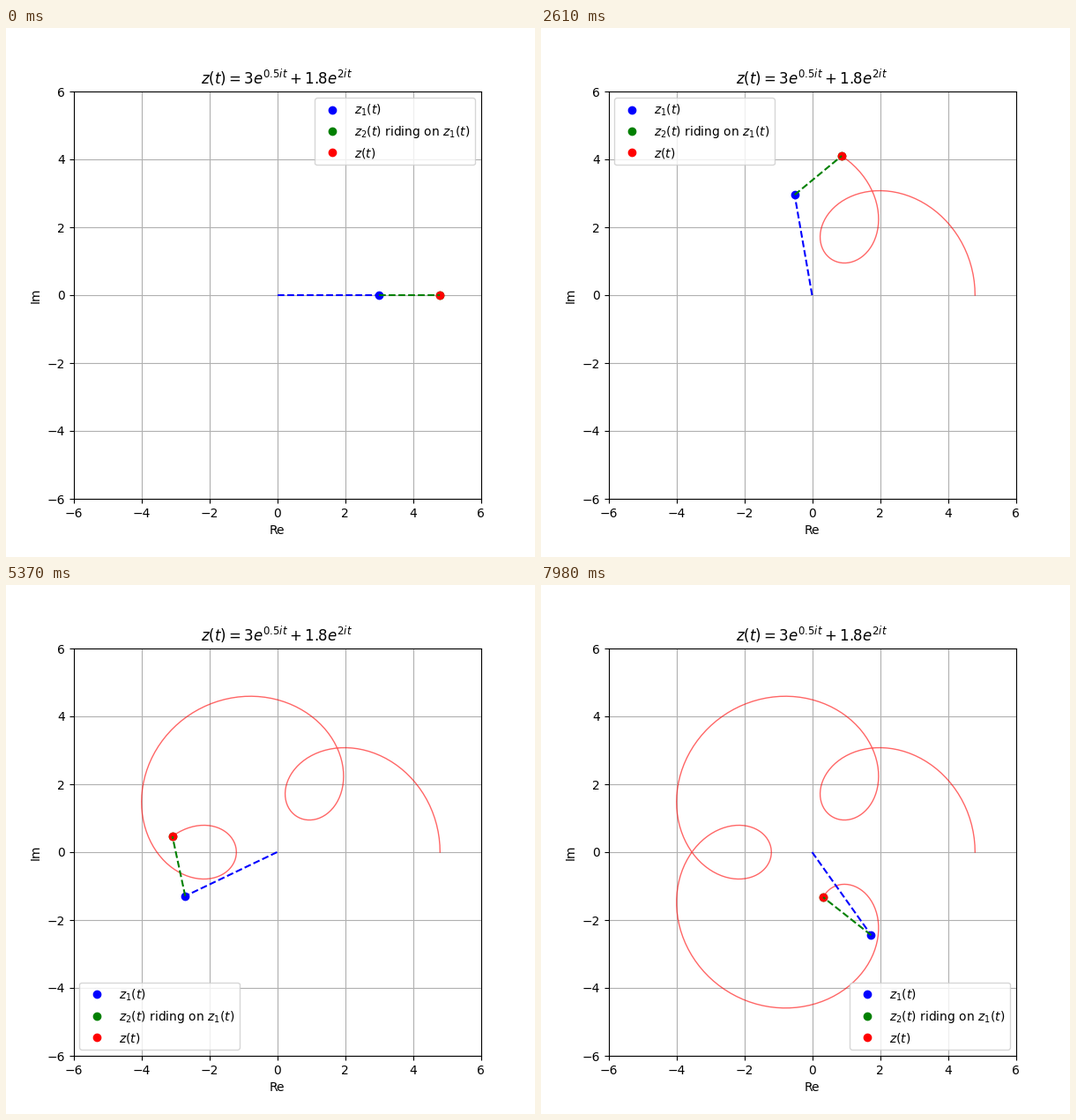
Recreate the animation shown at these times as a matplotlib script. Size 600 by 600 pixels, loop 8 s.

```python
import numpy as np
import matplotlib.pyplot as plt
from matplotlib.animation import FuncAnimation

LOOP_MS = 8000
FRAMES = 267

t = np.linspace(0, 20, 500)
z1 = 3 * np.exp(0.5j * t)
z2 = 1.8 * np.exp(2j * t)
z = z1 + z2

fig, ax = plt.subplots(figsize=(6, 6), dpi=100)
ax.set_xlim(-6, 6)
ax.set_ylim(-6, 6)
ax.set_aspect("equal")
ax.grid(True)
ax.set_xlabel("Re")
ax.set_ylabel("Im")
ax.set_title(r"$z(t) = 3e^{0.5it} + 1.8e^{2it}$")

dot1, = ax.plot([], [], "bo", label=r"$z_1(t)$")
dot2, = ax.plot([], [], "go", label=r"$z_2(t)$ riding on $z_1(t)$")
dot, = ax.plot([], [], "ro", label=r"$z(t)$")
trace, = ax.plot([], [], "r-", lw=1, alpha=0.6)
arm1, = ax.plot([], [], "b--")
arm2, = ax.plot([], [], "g--")
# The legend moves to the emptiest corner as the trace grows
ax.legend(loc="best")


def place(line, points):
    points = np.atleast_1d(points)
    line.set_data(points.real, points.imag)


def update(i):
    place(dot1, z1[i])
    place(dot2, z[i])
    place(dot, z[i])
    place(trace, z[:i + 1])
    place(arm1, [0, z1[i]])
    place(arm2, [z1[i], z[i]])
    return dot1, dot2, dot, trace, arm1, arm2


def init():
    return update(0)


anim = FuncAnimation(fig, update, frames=FRAMES, init_func=init,
                     interval=LOOP_MS / FRAMES, repeat=True, repeat_delay=0)
plt.show()
```
